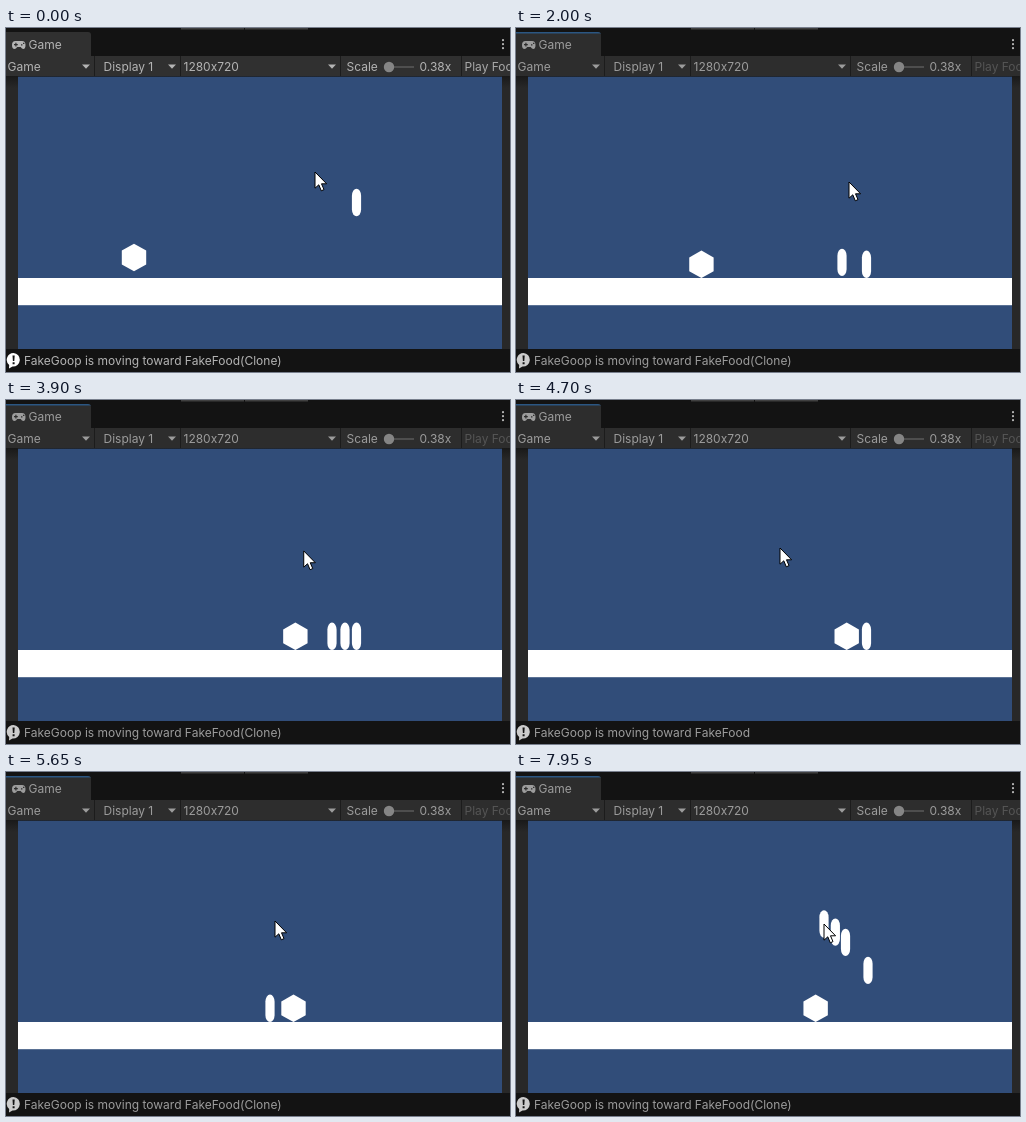
An HTML page that plays this animation: 504x344 px, repeating every 8000 ms.

```html
<!DOCTYPE html>
<html lang="en">
<head>
<meta charset="utf-8">
<title>Game view</title>
<style>
  html, body { margin: 0; width: 100%; height: 100%; overflow: hidden; background: #131313; }
  svg { display: block; width: 504px; height: 344px; --ink: #b4b4b4; --soft: #a8a8a8; --badge: #fff; --bar: #303030; }
  svg.playing { --ink: #9c9c9c; --soft: #555; --badge: #ccc; --bar: #2d2d2d; }
  text { font: 12px Inter, sans-serif; fill: var(--ink); white-space: pre; }
  .ink { fill: var(--ink); }
  .bar { fill: var(--bar); }
  .focus { display: none; fill: #2b5682; }
  .playing .focus { display: block; }
  .white { fill: #fff; }
</style>
</head>
<body>
<svg id="stage" viewBox="0 0 504 344">
  <defs>
    <path id="arrow" class="ink" d="M-4 -2H4L0 2.3Z"/>
    <linearGradient id="shade" x2="0" y2="1">
      <stop stop-color="#191919"/><stop offset="1" stop-color="#282828"/>
    </linearGradient>
  </defs>

  <!-- tab strip -->
  <rect width="504" height="28" fill="#131313"/>
  <path d="M175 .7H238M239 .7H302" stroke="#404040" stroke-width="1.4"/>
  <path class="bar" d="M0 28V4H82Q85 4 85 7V28Z"/>
  <path class="focus" d="M0 4H82Q84 4 85 5.5H0Z"/>
  <path class="ink" d="M9.5 13H16Q19.5 13 19.5 17Q19.5 21 17.3 21Q16 21 14.6 19H11.2Q10 21 8.5 21Q6 21 6 17Q6 13 9.5 13Z"/>
  <path class="bar" d="M8 16H9.3V14.7H10.5V16H11.8V17.2H10.5V18.5H9.3V17.2H8ZM15 16.2h1.4v1.4H15ZM17 14.7h1.4v1.4H17Z"/>
  <text x="22.5" y="21">Game</text>
  <path d="M497 12.2V21" stroke="#b4b4b4" stroke-width="2.2" stroke-linecap="round" stroke-dasharray="0 4"/>

  <!-- toolbar -->
  <rect class="bar" y="28" width="504" height="20"/>
  <path d="M88.5 28V48M174.5 28V48M334.5 28V48M455.5 28V48" stroke="#1c1c1c"/>
  <text x="1.5" y="42.7">Game</text>
  <text x="97.5" y="42.7">Display 1</text>
  <text x="177.5" y="42.7">1280x720</text>
  <text x="340.5" y="42.7">Scale</text>
  <text x="413.5" y="42.7">0.38x</text>
  <text x="458.5" y="42.7" style="fill:var(--soft)">Play Focused</text>
  <use href="#arrow" x="80" y="38.5"/>
  <use href="#arrow" x="166" y="38.5"/>
  <use href="#arrow" x="326" y="38.5"/>
  <path d="M383 39H408" stroke="#5a5a5a" stroke-width="1.5"/>
  <circle cx="383" cy="39" r="5.2" fill="#858585"/>

  <!-- game view -->
  <rect y="48" width="504" height="273" fill="#282828"/>
  <rect y="48" width="504" height="12" fill="url(#shade)"/>
  <rect x="12" y="48.75" width="484" height="272.25" fill="#314d79"/>
  <rect class="white" x="12" y="250" width="484" height="27.2"/>
  <g id="foods"></g>
  <path id="goop" class="white" d="M0 -13.8L12.2 -6.9V6.9L0 13.8L-12.2 6.9V-6.9Z"/>

  <!-- status bar -->
  <rect y="321" width="504" height="23" fill="#131313"/>
  <path style="fill:var(--badge)" d="M7.5 325A6.8 6.8 0 1 1 6.5 338.6L3 340.5L3.2 337A6.8 6.8 0 0 1 7.5 325Z"/>
  <path d="M6.5 327.5H8.7L8.3 333H6.9ZM6.6 334.3H8.6V336.2H6.6Z" fill="#131313"/>
  <text id="log" x="18" y="337"></text>

  <path id="cursor" d="M0 0V16.2L3.8 12.8L6.3 18.8L9 17.6L6.5 11.8H11.6Z" fill="#fff" stroke="#000" stroke-linejoin="round"/>
</svg>
<script>
const LOOP = 8000, STEP = 50, PLAY = 850;
const GRAVITY = 267, FLOOR = 236.3;          // px/s², resting centre
const SPEED = 54.7, REACH = 16.5;            // px/s, centre distance that counts as touching
const REACT = 150, BORED = 200;              // ms to notice food, ms until idling
const $ = id => document.getElementById(id);

// Each glide: start ms, end ms, destination
const glides = [
  [0, 100, 311, 146], [450, 550, 326, 150], [1250, 1650, 333, 154],
  [2400, 2550, 339, 154], [2600, 2900, 333, 154], [3500, 4500, 264, 148],
  [4900, 5200, 269, 149], [6600, 6900, 349, 149], [6900, 7300, 352, 165],
  [7450, 7950, 308, 152]
];
const dropTimes = [1205, 2590, 4830, 7450, 7650, 7760, 7950];

function cursorAt(t) {
  let x = 309, y = 144;
  for (const [from, to, endX, endY] of glides) {
    const k = Math.min(1, Math.max(0, (t - from) / (to - from)));
    const ease = 1 - (1 - k) ** 1.4;
    x += (endX - x) * ease;
    y += (endY - y) * ease;
  }
  return { x, y };
}

function fall(y, from, t) {
  const s = Math.max(0, t - from) / 1000;
  return Math.min(FLOOR, y + GRAVITY * s * s / 2);
}

// Food falls from wherever the cursor drops it; one piece is in the scene already.
const foods = [
  { name: "FakeFood", x: 350.5, y: 174.5, from: PLAY, shown: 0 },
  ...dropTimes.map(t => ({ name: "FakeFood(Clone)", ...cursorAt(t), from: t, shown: t }))
];

// The goop walks to the nearest food, eats it on touch, and idles when none is left.
function simulate() {
  let x = 128, wait = REACT, idle = 0;
  let log = "FakeGoop is moving toward FakeFood(Clone)";
  const states = [];
  for (let t = 0; t < LOOP; t += STEP) {
    if (t >= PLAY) {
      const [target] = foods.filter(f => f.from <= t && !f.eaten)
        .sort((a, b) => Math.abs(a.x - x) - Math.abs(b.x - x));
      if (!target) {
        wait = REACT;
        idle += STEP;
        if (idle > BORED) log = "Executing TestAction: Being idle uwu";
      } else if (wait > 0) {
        wait -= STEP;
      } else {
        idle = 0;
        log = "FakeGoop is moving toward " + target.name;
        const gap = target.x - x;
        const left = Math.abs(gap) - REACH;
        x += Math.sign(gap) * Math.min(SPEED * STEP / 1000, Math.max(0, left));
        if (left <= SPEED * STEP / 1000) target.eaten = t + STEP;
      }
    }
    states.push({ x, log });
  }
  return states;
}
const states = simulate();

const place = (el, x, y) => el.setAttribute("transform", `translate(${x} ${y})`);

for (const food of foods) {
  food.el = document.createElementNS("http://www.w3.org/2000/svg", "rect");
  const box = { class: "white", x: -4.6, y: -13.7, width: 9.2, height: 27.4, rx: 4.6, ry: 7 };
  for (const key in box) food.el.setAttribute(key, box[key]);
  $("foods").append(food.el);
}

function draw(t) {
  const { x, log } = states[t / STEP];
  const cursor = cursorAt(t);
  $("stage").classList.toggle("playing", t >= PLAY);
  $("log").textContent = log;
  place($("cursor"), cursor.x, cursor.y);
  place($("goop"), x, fall(229.5, PLAY, t));
  for (const { el, x, y, from, shown, eaten = LOOP } of foods) {
    el.style.display = t >= shown && t < eaten ? "" : "none";
    place(el, x, fall(y, from, t));
  }
}

const start = performance.now();
function tick() {
  const t = (performance.now() - start) % LOOP;
  draw(Math.floor(t / STEP) * STEP);
  requestAnimationFrame(tick);
}
tick();
</script>
</body>
</html>
```
